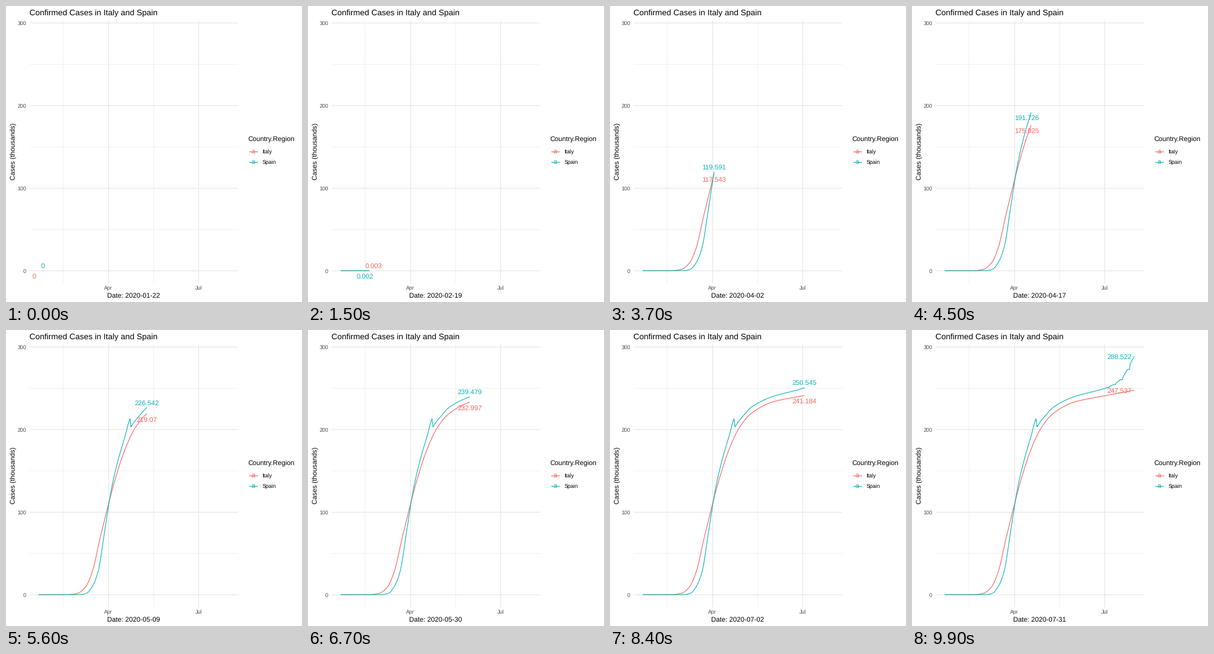
Write a matplotlib script that moves like this. It is 480 by 480 pixels and loops after 10 s.

```python
import numpy as np
import matplotlib.pyplot as plt
from matplotlib.animation import FuncAnimation

plt.rcParams["font.family"] = "Liberation Sans"
plt.rcParams["text.hinting"] = "none"

SIZE, DPI = 480, 72
FRAMES, DAYS = 100, 191
START = np.datetime64("2020-01-22")
LEFT, RIGHT, TOP, BOTTOM = 38, 376.3, 23.2, 448.5
RED, TEAL, GREY, GRID = "#F4655F", "#0DB3B9", "#4D4D4D", "#E6E6E6"


def smooth(days, values, at):
    """Monotone cubic curve through a few key points."""
    x, y = np.array(days, float), np.array(values, float)
    step = np.diff(x)
    slope = np.diff(y) / step
    a, b = slope[:-1], slope[1:]
    inner = 2 * a * b / np.maximum(a + b, 1e-12)
    m = np.concatenate([slope[:1], inner, slope[-1:]])
    i = np.clip(np.searchsorted(x, at, side="right") - 1, 0, len(step) - 1)
    h = step[i]
    t = (at - x[i]) / h
    rise = y[i + 1] - y[i]
    return (y[i] + rise * t * t * (3 - 2 * t)
            + h * t * (1 - t) * (m[i] * (1 - t) - m[i + 1] * t))


def italy_cases(days):
    cases = smooth(
        (0, 9, 29, 39, 47, 54, 62, 77, 87, 97, 109, 130, 163, 191),
        (0, .002, .003, 1.694, 9.172, 27.98, 69.176, 139.422, 175.925,
         201.505, 219.07, 232.997, 241.184, 247.537), days)
    return np.round(cases, 3)


def spain_cases(days):
    # from July on, weekends repeat Friday's count
    weekend = np.clip(days % 7 - 2, 0, 2) * (days % 7 < 5)
    days = np.where(days > 163, days - weekend, days)
    cases = smooth(
        (0, 18, 29, 42, 48, 54, 60, 66, 73, 80, 87, 92, 102, 110, 130, 163,
         177, 191),
        (0, .002, .002, .222, 1.695, 9.942, 28.768, 73.235, 126.168, 163.027,
         191.726, 213.024, 229.766, 239.736, 251.779, 262.845, 272.555,
         300.822), days)
    # late April revision lowers the total
    return np.round(cases - 12.3 * (days > 92), 3)


def px(day):
    return 53 + 1.6098 * day


def py(cases):
    return 429.3 - 1.34 * cases


fig = plt.figure(figsize=(SIZE / DPI, SIZE / DPI), dpi=DPI, facecolor="white")
ax = fig.add_axes([0, 0, 1, 1])
ax.set(xlim=(0, SIZE), ylim=(SIZE, 0))
ax.axis("off")


def line(xs, ys, color, width=1.1):
    return ax.plot(xs, ys, color=color, lw=width, solid_capstyle="butt",
                   solid_joinstyle="round")[0]


def text(x, y, s, size=11, color="black", ha="left", va="baseline", **kw):
    return ax.text(x, y, s, fontsize=size, color=color, ha=ha, va=va, **kw)


# Grid: minor lines first, then major
for cases in (50, 150, 250):
    line([LEFT, RIGHT], [py(cases)] * 2, GRID, 0.55)
for day in (24.5, 115.5):
    line([px(day)] * 2, [TOP, BOTTOM], GRID, 0.55)
for cases in (0, 100, 200, 300):
    line([LEFT, RIGHT], [py(cases)] * 2, GRID)
    text(32.8, py(cases) + 3.4, str(cases), 8.8, GREY, "right")
for day, month in ((70, "Apr"), (161, "Jul")):
    line([px(day)] * 2, [TOP, BOTTOM], GRID)
    text(px(day) + 0.3, 460, month, 8.8, GREY, "center")

text(38, 15, "Confirmed Cases in Italy and Spain", 13.2)
text(17.8, 236, "Cases (thousands)", ha="right", va="center", rotation=90)
date_text = text(207.2, 473, "", ha="center")

# Legend
text(392.2, 220, "Country.Region")
for y, name, color in ((235.8, "Italy", RED), (253, "Spain", TEAL)):
    line([394, 407.8], [y, y], color)
    text(401, y + 4, "a", color=color, ha="center")
    text(415.2, y + 3.4, name, 8.8)

all_days = np.arange(DAYS + 1)
series = [italy_cases(all_days), spain_cases(all_days)]
curves = [line([], [], c) for c in (RED, TEAL)]
labels = [text(0, 0, "", color=c, ha="center") for c in (RED, TEAL)]


def offsets(italy, spain, last):
    """Shift of each label from its point so that the two stay apart."""
    gap = abs(py(italy) - py(spain))
    if gap >= 17:
        near_edge = px(last) > RIGHT - 40
        return [(-24.3, 0.5) if near_edge else (-7, 8.8)] * 2
    side = 7 if gap < 2 else 0
    above, below = (side, -8.3), (-side, 8.8)
    return [above, below] if italy > spain else [below, above]


def update(frame):
    date_text.set_text(f"Date: {START + frame * DAYS // (FRAMES - 1)}")
    # last day that rounds to this frame
    last = min(DAYS, int(np.ceil((frame + 0.5) * DAYS / (FRAMES - 1))) - 1)
    days = all_days[:last + 1]
    now = [s[last] for s in series]
    shifts = offsets(*now, last)
    for s, curve, label, (dx, dy) in zip(series, curves, labels, shifts):
        curve.set_data(px(days), py(s[:last + 1]))
        label.set_text(f"{s[last]:g}")
        label.set_position((px(last) + dx, py(s[last]) + dy + 4))
    return [date_text, *curves, *labels]


anim = FuncAnimation(fig, update, frames=FRAMES, interval=100,
                     repeat=True, repeat_delay=0, blit=False)
plt.show()
```
